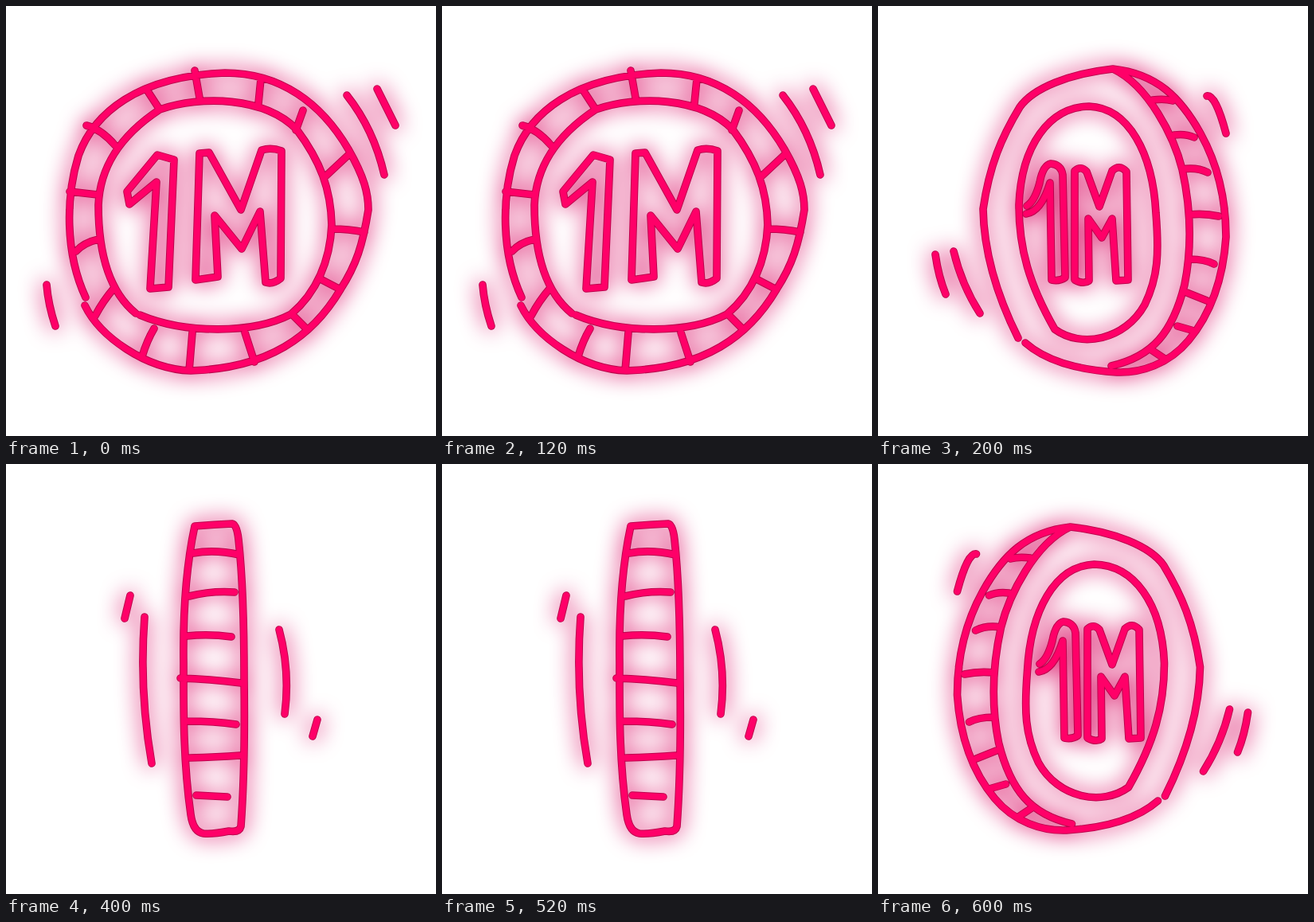
Write an HTML page that moves like this. It is 540 by 540 pixels and loops after 0.8 s.

```html
<!DOCTYPE html>
<html lang="en">
<head>
<meta charset="utf-8">
<title>Spinning coin</title>
<style>
html, body { margin: 0; width: 100%; height: 100%; overflow: hidden; background: #fff; }
svg { display: block; width: 100%; height: 100%; }
.pose { visibility: hidden; filter: drop-shadow(0 0 14px #d8005c); }
path { fill: none; stroke-linecap: round; stroke-linejoin: round; }
.rim { stroke: #bd004c; stroke-width: 9.6px; }
.ink { stroke: #ff0068; stroke-width: 7.6px; }
</style>
</head>
<body>
<svg id="stage" viewBox="0 0 540 540"></svg>
<script>
const front = `
  M100 366C74 310 75 240 91 188C110 135 165 88 275 84C345 84 396 122 430 180C450 215 455 235 455 256
  C448 300 440 325 420 356C385 415 330 455 232 458C175 456 118 415 99 376
  M163 386C125 355 116 300 116 250C118 205 140 165 193 130C245 112 325 114 365 155
  C395 195 408 230 409 275C407 320 390 360 358 387C310 412 225 412 168 388
  M237 81L243 115M176 104L193 130M101 150Q120 155 137 175M80 233L115 237M88 308Q98 297 116 293
  M112 389Q122 370 136 354M186 405Q177 420 171 440M234 410L230 458M300 410L312 447M360 388L376 404
  M395 343L420 356M410 280Q430 280 450 284M400 215L430 187M373 131L364 156M320 92L317 122
  M152 233L190 187L211 193L204 353L181 355L189 221L155 249Z
  M243 185L255 184L295 256L321 181Q333 177 346 182L345 342Q335 350 326 347L319 258L296 305L262 263L266 340L238 344Z
  M428 112Q462 155 475 212M466 104L489 150M51 350Q53 375 62 402`;

const tilted = `
  M176 417C150 365 133 310 132 255C140 200 155 165 178 127C195 103 240 85 295 79
  C350 85 380 115 405 160C430 205 437 250 437 290C433 350 415 390 390 420C365 450 330 461 300 460C250 457 210 445 185 423
  M295 79C340 100 372 165 382 205C392 250 395 300 385 350C370 410 345 440 293 452
  M222 406C190 350 177 305 177 250C180 175 215 127 265 126C315 128 345 185 349 260C353 310 352 340 335 375C310 420 255 430 222 406
  M345 118Q360 116 370 119M372 162Q386 160 397 165M382 205Q400 202 414 209M391 262Q410 260 428 264
  M392 318Q410 318 422 324M388 360L413 370M376 402L397 408M342 431L360 443
  M413 113Q424 111 437 160M72 312Q76 340 85 362M95 308Q105 350 128 386`;

const label = `
  M187 251Q197 245 203 222Q207 200 217 198Q230 199 232 212L235 341Q228 346 218 344L216 222Q205 258 186 261
  M247 207Q255 200 262 208L278 252L294 207Q303 198 312 208L314 344L299 345L294 267L281 291L264 267L265 345Q258 350 247 344Z`;

const edge = `
  M237 78Q262 76 284 75Q290 76 292 95C297 140 299 200 299 270C300 340 299 400 295 455Q293 463 280 461
  Q260 465 248 464Q235 462 232 440C222 370 223 300 223 250C222 180 228 120 237 78
  M235 112Q262 107 293 114M230 166Q258 159 287 161M227 216Q255 213 283 217M219 269Q255 270 295 275
  M228 323Q262 323 289 327M231 369Q265 368 294 366M239 416L278 418
  M156 165L149 194M174 192Q167 285 183 376M343 208Q357 260 350 314M391 321L385 342`;

const mirror = "matrix(-1 0 0 1 536.5 0)";
const shift = "translate(16 0)";

// Each pose is a list of [path, transform]; the rims lie below all the ink.
const poses = [
  [[front, ""]],
  [[tilted, ""], [label, ""]],
  [[edge, ""]],
  [[tilted, mirror], [label, shift]]
];

const layer = (parts, name) => parts
  .map(([d, move]) => `<path class="${name}" d="${d}" transform="${move}"/>`).join("");

const stage = document.getElementById("stage");
stage.innerHTML = poses
  .map(parts => `<g class="pose">${layer(parts, "rim")}${layer(parts, "ink")}</g>`).join("");

const groups = [...stage.children];
const start = performance.now();

function draw() {
  const now = Math.floor((performance.now() - start) / 200) % poses.length;
  groups.forEach((g, i) => { g.style.visibility = i === now ? "visible" : "hidden"; });
  requestAnimationFrame(draw);
}
draw();
</script>
</body>
</html>
```
